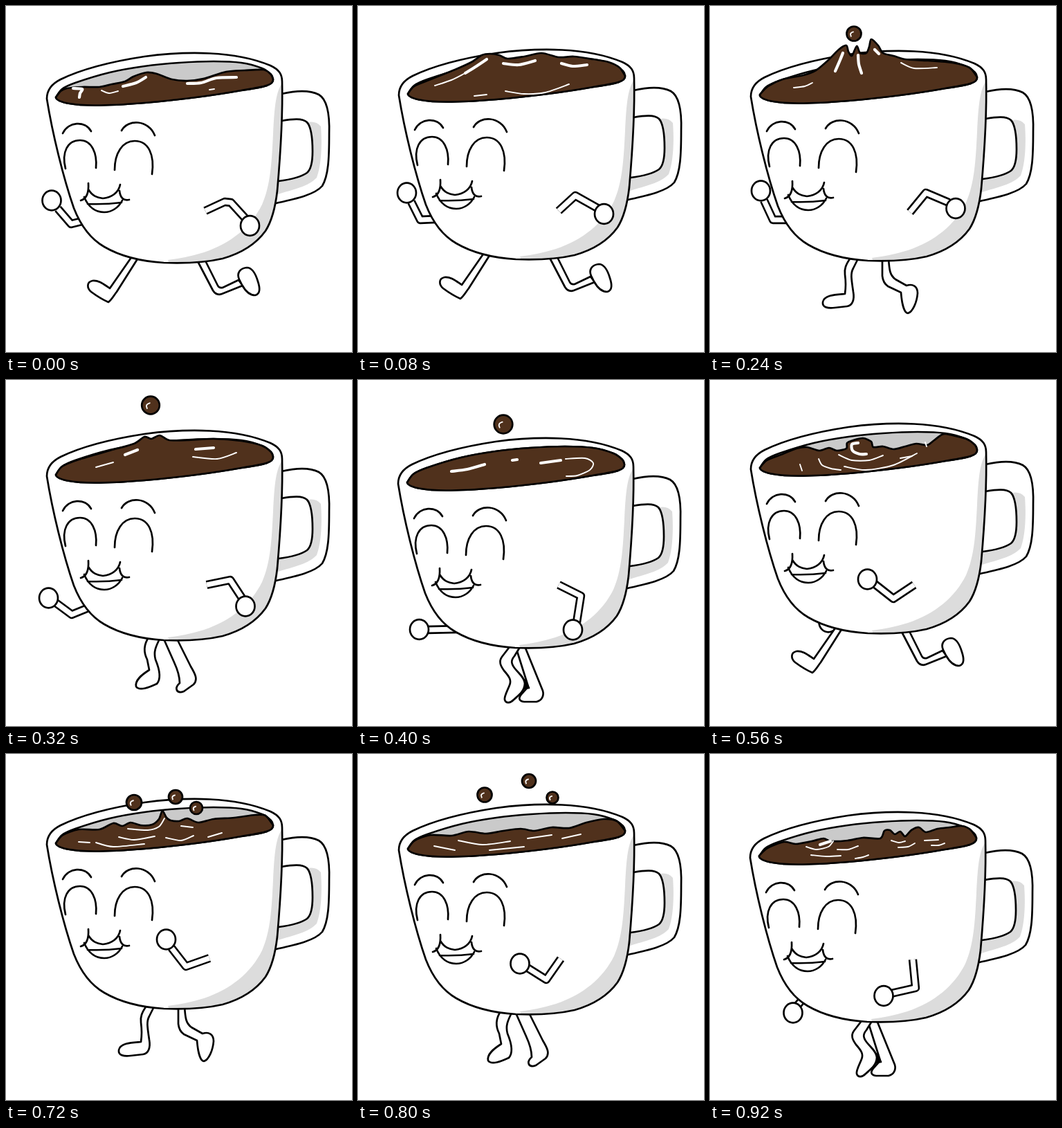
Animation, 500 px wide and 500 px high, one loop 0.96 s. Source, as an HTML page:

```html
<!DOCTYPE html>
<html lang="en">
<head>
<meta charset="utf-8">
<title>Running coffee cup</title>
<style>
  html, body { margin: 0; width: 100%; height: 100%; overflow: hidden; background: #fff; }
  svg { display: block; width: 100vw; height: 100vh; }
  .ink { fill: none; stroke: #000; stroke-width: 2.7; stroke-linecap: round; stroke-linejoin: round; }
  .skin { fill: #fff; }
  .shade { fill: #dcdcdc; }
  .hollow { fill: #cacaca; }
  .coffee { fill: #50311c; }
  .shine { fill: none; stroke: #fff; stroke-width: 1.9; stroke-linecap: round; stroke-linejoin: round; }
  .bold { stroke-width: 4.2; }
  .limb { fill: none; stroke-linejoin: round; }
  .outer { stroke: #000; stroke-width: 12.4; }
  .inner { stroke: #fff; stroke-width: 7.2; }
</style>
</head>
<body>
<svg viewBox="0 0 500 500">
  <defs>
    <path id="cup" d="M59 129C59 116 67 107 79 101C112 85 154 75 200 68C230 64 265 62 295 63.500C330 65 360 72 382 81C395 87 399 94 399 104C400 145 397 205 392 262C389 288 384 306 375 320C362 338 341 352 313 360C287 366 255 367 228 366C196 364 166 357 142 343C121 331 107 310 98 287C83 244 67 179 59 129Z"/>
    <clipPath id="inside"><use href="#cup"/></clipPath>
  </defs>
  <g id="backArm"></g>
  <g class="body" id="legs"></g>
  <g class="body">
    <path class="skin" d="M398 122C420 117 440 117 452 123C464 130 468 150 467 180C467 215 466 240 457 255C446 268 417 274 390 280Z"/>
    <path class="shade" d="M437 163Q448 161 455 169C457 195 456 225 449 243C437 256 415 260 393 267L393 248C410 245 428 243 436 236C444 222 444 185 437 163Z"/>
    <path class="ink" d="M398 122C420 117 440 117 452 123C464 130 468 150 467 180C467 215 466 240 457 255C446 268 417 274 390 280M398 161C415 158 428 157 435 163C442 171 443 190 443 205C443 220 441 231 435 236C425 243 410 246 394 248"/>
    <use href="#cup" class="skin"/>
    <path class="shade" clip-path="url(#inside)" d="M401 104C390 116 388 140 386 180C384 222 382 255 370 282C354 314 325 338 286 351Q260 359 234 362L240 380H420V104Z"/>
    <use href="#cup" class="ink"/>
    <g id="brew"></g>
    <path class="ink" d="M82 179C90 162 114 160 123 176M167 175C176 158 206 159 215 182
      M86 230C80 206 89 189 107 189C124 189 132 208 130 229M157 232C157 208 168 190 186 190C206 190 215 210 211 238
      M108 276C115 274 120 267 119 251M119 260C125 270 132 272 140 273C153 272 163 264 165 253M164 262C165 272 170 277 178 275
      M113 271C119 286 130 293 142 293C153 293 163 286 168 276M118 281Q143 282 167 279"/>
  </g>
  <g id="frontArm"></g>
</svg>
<script>
const $ = id => document.getElementById(id);

// Smooth curve through "x y x y ..."
function smooth(list) {
  const n = list.split(' ').map(Number), p = [];
  for (let i = 0; i < n.length; i += 2) p.push([n[i], n[i + 1]]);
  const at = i => p[Math.max(0, Math.min(p.length - 1, i))];
  let d = 'M' + p[0];
  for (let i = 0; i < p.length - 1; i++) {
    const c = k => [0, 1].map(a => at(i + k)[a] + (at(i + k + 1)[a] - at(i + k - 1)[a]) * (k ? -.14 : .14));
    d += `C${c(0)} ${c(1)} ${p[i + 1]}`;
  }
  return d;
}

const LIP = 'C387 110 371 112 340 117C290 126 245 131 200 135C150 139 112 140 92 136C80 134 73 131 72 127Z';
const RIM = '72 127 81 115 100 106 150 91 200 82 250 77 300 75 340 77 370 85 383 94 386 101';
const RIGHT = '340 78 370 85 383 94 386 101';

// Legs, relative to the cup
const LEGS = {
  stride: ['M182 357L150 403C141 397 134 391 125 392C116 394 117 403 123 408C131 414 139 419 148 423C153 419 156 413 160 408L191 359',
    'M276 362L299 406Q304 414 312 411L342 399L336 391L313 402Q308 403 306 399L288 363',
    'M341 398C346 407 353 413 360 413C368 411 367 402 364 393C361 383 356 373 348 373C338 374 333 381 337 390Z'],
  pass: ['M190 357L171 391L167 407C156 403 143 400 138 406C134 414 141 419 149 421L169 426Q176 424 178 414L182 394L203 360',
    'M262 362L277 397Q280 405 288 406L312 408C314 418 320 428 329 428C337 426 335 413 332 403C328 391 319 388 312 397L291 396Q287 395 285 390L273 362'],
  stand: ['M203 362C196 372 194 378 195 386Q197 401 195 414C184 415 165 415 163 426C162 434 171 435 180 434L198 432C206 431 209 422 207 411C204 391 203 384 207 377L214 363',
    'M249 362L249 388Q250 398 257 403L276 412C277 425 280 442 286 442C293 440 299 426 300 413C300 403 293 399 284 402L268 393C260 387 259 380 258 362'],
  cross: ['M227 362L243 398C249 411 251 421 251 428C243 435 246 444 257 440L271 430C278 423 273 414 267 404L246 362',
    'M206 362C198 374 199 384 204 394L207 409C196 416 186 424 188 433C193 440 207 434 218 429C225 421 221 406 216 394C213 383 216 376 223 362'],
  tuck: ['M230 368L247 422L239 431C232 438 233 443 241 444L259 444C267 442 270 435 268 428L242 364',
    'M241 412L248 424L240 425Z',
    'M219 366L209 379C204 386 207 392 212 399C220 408 223 413 220 420C217 428 212 436 213 441C215 447 221 446 226 441C234 434 242 428 242 417C241 408 233 403 227 395C222 388 222 384 227 378L235 365']
};

// Coffee: surface line, thin shines, bold shines, drops [x, y, r]
const BREW = [
  ['72 127 79 118 88 114 110 112 135 112 153 108 172 104 184 97 203 91 218 93 240 101 262 103 285 100 318 90 345 88 372 87 383 94 386 101',
    ['138 117 149 121 162 118', '294 116 301 115'], ['97 114 110 115 107 121 106 127', '169 111 188 106 202 98', '262 107 282 106 304 99 333 98']],
  ['72 127 81 116 105 106 140 92 164 81 179 71 191 69 204 71 216 76 240 73 265 68 290 74 312 73 340 77 362 81 378 89 386 101',
    ['111 115 135 107 153 98', '213 123 240 127 270 125 305 113', '168 130 186 128'], ['155 97 168 89 186 77', '210 83 232 85 256 79', '294 83 310 87 331 85']],
  ['72 127 82 116 105 105 140 94 165 83 180 70 193 60 201 67 208 58 217 66 231 57 241 67 262 70 290 74 ' + RIGHT,
    ['117 115 148 105', '215 118 255 121 296 111'], ['172 90 188 71', '212 72 216 88', '284 82 305 87 330 86']],
  ['72 126 84 114 105 104 135 98 153 91 170 77 186 61 197 55 200 64 205 70 212 56 217 66 226 66 230 57 233 46 243 55 250 66 265 70 282 75 315 77 350 80 375 87 386 101',
    ['121 116 137 114 148 109', '276 80 295 88 328 87'], ['192 66 188 76 181 92', '214 69 215 82 219 95', '238 61 244 67'], [[208, 38, 10.5]]],
  ['72 127 81 115 105 105 150 92 185 82 200 72 210 75 222 70 236 77 262 77 300 75 ' + RIGHT,
    ['130 116 155 109', '270 101 305 104 333 95'], ['172 98 190 91', '274 90 300 88'], [[209, 26.5, 12.8]]],
  [RIM, ['301 93 329 92 341 99 336 109 318 117 302 118'], ['136 111 159 108 184 101', '224 95 231 94', '265 99 294 95'], [[211, 43, 13.3]]],
  [RIM, ['301 93 329 92 341 99 336 109 318 117', '176 108 207 114 244 107'], ['138 111 175 102', '265 98 290 95'], [[211, 72, 13.3]]],
  ['72 127 81 115 105 105 140 96 170 93 185 98 200 101 218 102 235 99 250 94 275 91 300 83 320 79 ' + RIGHT,
    ['170 109 205 117 255 109', '150 119 195 128 260 122 305 109'], ['128 112 150 106', '300 94 318 91'], [[215, 88, 13]]],
  ['72 127 82 116 105 107 125 99 140 97 158 102 172 98 183 102 197 99 198 91 207 87 221 84 233 89 236 97 250 96 265 100 282 96 298 92 314 94 324 87 332 81 ' + RIGHT,
    ['157 114 162 123 175 128 189 130', '186 108 205 116 230 116 250 109', '194 125 225 130 265 123 299 106', '130 122 133 131', '275 113 292 110', '311 90 313 96'], ['214 91 205 93 206 102 216 107 226 107']],
  ['72 127 82 116 106 107 130 105 150 99 172 102 190 96 201 82 207 72 215 81 223 67 232 79 243 69 249 85 258 95 278 95 302 91 325 88 ' + RIGHT,
    ['132 124 160 131 195 129', '170 114 200 118 235 113', '240 123 275 117', '290 108 312 104'], ['208 88 207 99', '229 81 232 93'], [[191, 66, 8], [240, 54, 8]]],
  ['72 127 82 115 105 107 135 107 155 98 168 102 180 97 195 101 211 100 221 92 226 80 232 90 238 94 250 95 262 91 278 97 300 92 330 90 360 86 375 87 386 101',
    ['105 125 121 126', '130 126 155 132 200 128', '163 118 185 122 215 117', '176 106 205 108 221 103 229 91', '231 119 253 123 271 116', '253 102 270 104', '292 118 312 112'], [], [[185, 68, 11], [245, 60, 10], [275, 76, 9]]],
  ['72 127 82 115 105 107 135 108 160 102 185 105 210 101 235 98 255 101 280 96 305 97 330 89 355 84 374 87 386 101',
    ['110 123 140 129', '145 115 180 121 220 116', '190 129 240 124', '245 112 280 107', '295 112 322 106'], [], [[183, 49, 10.5], [247, 29, 10], [281, 53, 8.5]]],
  ['72 127 82 115 107 106 128 109 155 102 180 106 205 102 230 100 252 97 270 100 291 94 310 95 330 88 350 84 374 87 386 101',
    ['145 125 190 126', '185 117 215 112', '262 105 285 104', '275 113 300 107', '312 104 332 102'], ['142 114 172 108'], [[255, 75, 9], [292, 76, 8.5]]],
  ['72 126 84 115 108 106 125 109 148 105 165 101 176 105 200 104 222 100 247 101 253 90 261 89 268 95 276 91 283 98 292 89 303 85 313 92 330 87 347 85 365 83 377 88 386 100',
    ['140 113 155 117 172 113 179 105', '147 125 170 127 190 126', '185 117 201 117 215 112', '211 130 222 128 230 125', '263 104 274 107 283 105', '273 114 287 113 297 108', '311 104 331 103', '321 111 331 111 340 108'], ['160 110 175 105']]
];

// start, cup dy, legs, back hand, back arm, front hand, front arm
const POSES = [
  [0, 5, 'stride', [66, 281], '75 293 94 315 114 310', [352.500, 317.500], '288 296 316 283 325 284 346 307'],
  [80, 0, 'stride', [70.500, 270], '77 283 90 309 112 308', [355.500, 300.500], '290 296 314 274 346 292'],
  [160, 0, 'pass', [72, 267], '78 281 91 308 112 308', [355.500, 295], '289 297 313 272 345 287'],
  [240, 2, 'stand', [73.500, 267], '78 281 91 309 112 309', [355, 292.500], '289 298 312 270 345 284'],
  [320, 10, 'cross', [61.500, 315], '72 322 95 339 122 328', [346, 327], '290 296 324 289 341 315'],
  [400, 21, 'tuck', [88.500, 360.500], '100 361 144 360', [310.500, 361], '290 296 322 312 316 350'],
  [440, 21, 'tuck', [104, 371], '114 367 142 355', [282, 361], '292 296 310 327 290 352'],
  [480, 5, 'stride', [143, 361], '148 354 160 345', [243, 321], '294 296 286 328 255 323'],
  [560, 0, 'stride', [171, 350], '172 342 175 330', [227.500, 288], '295 296 265 316 237 294'],
  [640, 0, 'pass', null, '', [229, 276], '294 296 262 311 237 286'],
  [720, 2, 'stand', null, '', [231.500, 268], '294 295 260 307 239 280'],
  [800, 10, 'cross', null, '', [234, 303], '293 296 272 326 245 309'],
  [880, 21, 'tuck', [142, 374], '146 365 154 350', [241, 334], '293 297 288 334 254 337'],
  [920, 21, 'tuck', [120, 374], '124 366 136 352', [251, 349.500], '293 297 297 338 262 346']
];

const stroke = (cls, d) => `<path class="${cls}" d="${d}"/>`;

function arm(hand, joints) {
  if (!hand) return '';
  const d = 'M' + joints;
  return stroke('limb outer', d) + stroke('limb inner', d) +
    `<ellipse class="ink" style="fill:#fff" cx="${hand[0]}" cy="${hand[1]}" rx="13.500" ry="14.300"/>`;
}

function drop([x, y, r]) {
  return `<circle class="ink coffee" style="fill:#50311c" cx="${x}" cy="${y}" r="${r}"/>` +
    stroke('shine', `M${x - r * .1} ${y - r * .25}Q${x - r * .65} ${y - r * .1} ${x - r * .4} ${y + r * .35}`);
}

function brew([surface, thin, bold, drops = []]) {
  const open = smooth(RIM) + LIP, fluid = smooth(surface) + LIP;
  return stroke('hollow', open) + stroke('ink', open) + stroke('coffee', fluid) + stroke('ink', fluid) +
    thin.map(s => stroke('shine', smooth(s))).join('') +
    bold.map(s => stroke('shine bold', smooth(s))).join('') +
    drops.map(drop).join('');
}

function leg(d, i, all) {
  const gap = all === LEGS.tuck && i === 1;
  return `<path class="ink" style="fill:${gap ? '#000' : '#fff'}" d="${d}"/>`;
}

let shown = -1;
function draw() {
  const t = performance.now() % 960;
  const i = POSES.filter(p => p[0] <= t).length - 1;
  if (i !== shown) {
    shown = i;
    const [, dy, legs, backHand, back, frontHand, front] = POSES[i];
    const dx = dy > 20 ? -1 : 0;
    document.querySelectorAll('.body').forEach(g => g.setAttribute('transform', `translate(${dx} ${dy})`));
    $('legs').innerHTML = LEGS[legs].map(leg).join('');
    $('brew').innerHTML = brew(BREW[i]);
    $('backArm').innerHTML = arm(backHand, back);
    $('frontArm').innerHTML = arm(frontHand, front);
  }
  requestAnimationFrame(draw);
}
draw();
</script>
</body>
</html>
```
